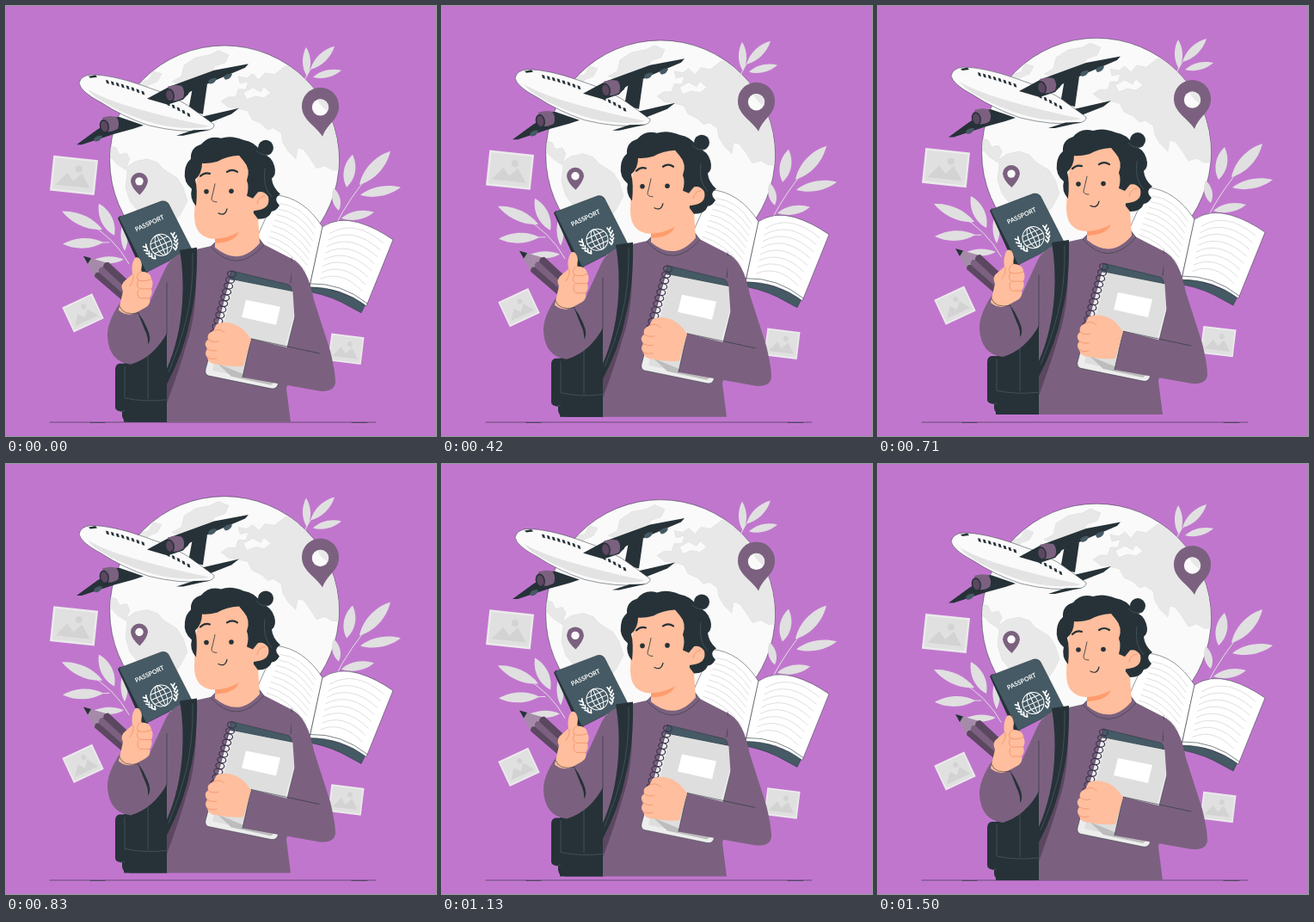
These frames come from a looping animation (500 by 500 pixels, 1.54 s). An HTML page:

```html
<!DOCTYPE html>
<html lang="en">
<head>
<meta charset="utf-8">
<title>Study abroad</title>
<style>
  html, body { margin: 0; width: 100%; height: 100%; overflow: hidden; background: #c176ce; }
  svg { display: block; width: 100vw; height: 100vh; }
  .dark { fill: #263238; }
  .slate { fill: #455a64; }
  .mauve { fill: #7b617f; }
  .deep { fill: #5c4761; }
  .skin { fill: #ffbe9d; }
  .land { fill: #e8e8e8; stroke: #d8d8d8; stroke-width: .5; }
  .white { fill: #fafafa; }
  .ink { fill: none; stroke: #263238; stroke-width: .6; stroke-linecap: round; stroke-linejoin: round; }
  .edge { stroke: #263238; stroke-width: .5; stroke-linejoin: round; }
  .fold { fill: none; stroke: #ee8b63; stroke-width: .7; stroke-linecap: round; }
  .pale { fill: none; stroke: #fff; stroke-width: 1; stroke-linecap: round; }
  .seam { fill: none; stroke: #52636c; stroke-width: .6; }
</style>
</head>
<body>
<svg viewBox="0 0 500 500">
  <defs>
    <clipPath id="disc"><circle cx="254" cy="179.5" r="133"/></clipPath>
    <g id="photo">
      <path d="M-26-20.500H26V20.500H-26z" fill="#ebebeb"/>
      <path d="M-23.500-18H23.500V18H-23.500z" fill="#e0e0e0"/>
      <path d="M-20 13L-8-2L0 7L9-3L20 13z" fill="#d3d3d3"/>
      <circle cx="5" cy="-8" r="4" fill="#d3d3d3"/>
    </g>
    <g id="engine">
      <path class="mauve" d="M-7-8Q5-12 14-7L16 1Q7 10-4 8z"/>
      <path class="dark" d="M9-9L15-7L17 1L11 5Q14-3 9-9z"/>
      <ellipse class="dark" cx="-5" cy="1" rx="5.500" ry="8" transform="rotate(-12)"/>
      <ellipse class="deep" cx="-5" cy="1" rx="4" ry="6.300" transform="rotate(-12)"/>
    </g>
    <path id="pod" class="slate" d="M-5 1Q-2-4 5-3Q4 3-3 4z"/>
  </defs>

  <path class="ink" d="M51 484H430M98 484.500H115M402 484.500H420"/>

  <g id="scene">
    <circle class="white edge" cx="254" cy="179.500" r="133.300"/>
    <g clip-path="url(#disc)" class="land">
      <path d="M151 99L158 88L166 86L171 76L181 79L176 88L166 92L160 101z"/>
      <path d="M193 88L204 82L207 69L221 60L237 57L247 52L259 57L255 66L243 70L238 79L224 84L213 94z"/>
      <path d="M250 111L258 106L267 106L270 97L279 97L282 88L272 90L270 82L280 84L287 79L294 86L301 78L312 80L325 70L345 72L395 115V191L379 191L371 186L361 189L354 178L346 167L339 165L337 178L328 169L322 159L320 148L311 142L304 144L297 137L286 132L281 122L268 119L259 118z"/>
      <path d="M121 163L128 165L132 173L140 171L144 178L140 188L150 181L164 178L176 182L183 190L199 200L206 211L211 227L203 242L193 255L188 280L168 270L156 242L144 227L139 211L141 192L129 184L120 174z"/>
      <path class="white" d="M276 101L287 95L296 100L300 94L308 101L300 107L290 105L280 109z"/>
    </g>

    <g id="leaves" fill="#e0e0e0" stroke="#e0e0e0" stroke-linecap="round"></g>

    <path class="mauve" d="M365.500 95A21.500 21.500 0 0 1 387 117C387 133 374 136 368 152C361 140 344 133 344 117A21.500 21.500 0 0 1 365.500 95z"/>
    <circle class="white" cx="365.500" cy="118" r="9.700"/>
    <path fill="#e8e8e8" d="M362 109A9.700 9.700 0 0 1 374 122Q366 118 362 109z"/>
    <path class="mauve" d="M155 194A10 10 0 0 1 165 204Q164 211 155.500 220Q146 212 145 204A10 10 0 0 1 155 194z"/>
    <circle class="white" cx="155" cy="204" r="4.700"/>

    <use href="#photo" transform="translate(79 197) rotate(6)"/>
    <use href="#photo" transform="translate(89.500 357) rotate(-25) scale(.74 .78)"/>
    <use href="#photo" transform="translate(395.500 399) rotate(7) scale(.74 .78)"/>

    <g id="plane">
      <path class="dark" d="M212 122L217 95L234 91L229 126z"/>
      <path class="dark" d="M219 131L271 119L262 126L234 137z"/>
      <path class="white edge" d="M85 90Q87 81 99 80Q123 80 160 93Q200 106 220 122L242 138Q243 143 233 145Q202 148 166 139Q136 129 110 112Q87 100 85 90z"/>
      <path fill="#e3e3e3" d="M95 97Q113 108 147 118Q188 130 236 140Q228 143 205 142Q180 140 160 133Q128 122 110 110Q100 104 95 97z"/>
      <path class="dark" d="M96 82L104 80.500L106 83L98 84z"/>
      <path class="dark" d="M198 151L218 144.500L237 144L206 151z"/>
      <path class="dark" d="M164 108L190 94L242 75L282 67.500L278 72L245 86L214 100L206 109L188 115z"/>
      <path class="dark" d="M82 161.500L106 144L131 129L160 139L148 143L126 149L88 161.500z"/>
      <use href="#engine" x="119" y="138"/>
      <use href="#engine" x="195" y="102"/>
      <use href="#pod" x="240" y="87"/>
      <use href="#pod" x="258" y="82"/>
      <use href="#pod" x="107" y="154"/>
    </g>

    <g id="book">
      <path class="slate edge" d="M354 320L419 345L413 357L400 350Q380 338 355 333z"/>
      <path fill="#fff" class="edge" d="M368 257Q346 223 314 220L286 282Q328 285 353 326z"/>
      <path fill="#fff" class="edge" d="M368 257Q386 245 410 252Q430 258 450 272L419 349Q390 327 353 327z"/>
      <path class="ink" d="M354 323Q390 322 420 346"/>
      <path id="lines" fill="none" stroke="#d6d6d6" stroke-width=".8"/>
    </g>

    <g id="passport">
      <path class="dark" d="M130 247L133 244L165 311L158 309z"/>
      <path class="slate edge" d="M131 246L181 227Q186 226 189 230L216 283L163 310z"/>
      <text transform="translate(168 255) rotate(-25)" text-anchor="middle" font-family="Lato, sans-serif" font-weight="700" font-size="7.300" fill="#fff">PASSPORT</text>
      <g class="pale" transform="translate(180.500 278) rotate(-24)">
        <circle r="12.500"/><ellipse rx="5.800" ry="12.500"/>
        <path d="M0-12.500V12.500M-12.500 0H12.500M-11-6H11M-11 6H11"/>
        <g id="laurel"></g>
      </g>
    </g>

    <g id="pencil">
      <path fill="#a58ba9" d="M90 291L118 299L103 315z"/>
      <path class="dark" d="M90 291L99 293.500L95 300z"/>
      <path class="deep" d="M103 315Q103 309 108 310Q108 303 113 304Q113 298 119 298L160 336L146 352z"/>
      <path class="mauve" d="M108 310Q108 303 113 304L155 343L151 348z"/>
    </g>

    <g id="backpack">
      <path class="dark" d="M187 376Q170 405 137 416V484H187z"/>
      <path class="dark" d="M138 416H132Q127 417 127 423V467Q127 472 138 472z"/>
      <path class="dark" d="M135 458V477Q136 484 145 484H188V458z"/>
      <path class="seam" d="M165 402V457M138 419V456Q160 461 187 458M135 471H138"/>
    </g>

    <g id="torso">
      <path class="mauve" d="M222 283Q196 286 187 308V484H331L326 445L338 400L358 345Q352 302 330 293L297 276L240 279z"/>
      <path class="mauve" d="M222 283Q194 286 185 306L167 345L132 346Q117 369 118 385Q120 414 145 417Q172 409 188 379L208 310z"/>
      <path class="deep" d="M221 310Q222 358 210 393Q202 422 187 462V430z"/>
      <path class="dark" d="M202 284L222 281Q223 330 214 365Q207 402 187 440V422Q202 388 205 345Q207 312 202 284z"/>
      <path class="seam" d="M217 287Q218 331 209 367Q202 396 189 426"/>
      <path class="ink" d="M187 322V382M332 293Q334 303 331 322"/>
      <path class="dark" d="M153 356Q160 365 164 375Q170 388 165 394Q166 386 161 376Z"/>
    </g>

    <g id="head">
      <path class="mauve edge" d="M238 280Q268 314 300 278L294 270L244 274z"/>
      <path class="skin" d="M243 257L292 232L295 276Q271 304 243 281z"/>
      <path fill="#ff9b6c" d="M243 269Q261 268 272 257Q271 275 243 276z"/>
      <path class="dark" d="M275 158Q290 158 297 171Q309 175 312 186Q315 196 309 201Q310 211 319 219Q310 224 318 232Q314 239 309 239Q306 248 293 248L272 220z"/>
      <circle class="dark" cx="302" cy="165" r="9"/>
      <path class="skin" d="M224 180Q220 210 219 244Q219 269 241 271Q272 270 287 247L292 206L278 171L240 166z"/>
      <path class="skin" d="M284 221Q298 211 305 222Q308 236 291 238L284 239z"/>
      <path class="fold" d="M292 230Q293 222 301 221"/>
      <path class="dark" d="M221 233Q213 224 216 213Q206 205 208 192Q209 183 215 178Q214 165 227 161Q236 150 250 154Q262 150 276 156Q290 158 296 170L300 208L287 224L280 221Q283 210 280 203Q285 190 276 180L271 174Q256 175 246 181Q234 184 228 183Q228 195 220 202Q223 213 221 233z"/>
      <path class="seam" d="M291 168Q298 176 308 172M301 189Q298 211 309 222"/>
      <circle class="dark" cx="233" cy="216" r="2.800"/><circle class="dark" cx="262" cy="215.500" r="2.800"/>
      <path class="ink" style="stroke-width:2.200" d="M226 198Q231 193 237 195M257 193Q263 189 269 193"/>
      <path class="ink" style="stroke-width:.8" d="M243 207Q241 217 239 224Q239 228 245 228"/>
      <path class="ink" style="stroke-width:1.200" d="M247 241Q255 245 257 236"/>
    </g>

    <g id="notebooks">
      <path class="slate edge" d="M262 308L328 324Q333 326 332 334L320 380L250 360z"/>
      <path fill="#ededed" class="edge" d="M260 318L337 333Q342 335 341 341L316 441Q314 446 308 445L235 430Q231 428 232 423z"/>
      <path fill="#dedede" d="M266 319L336 333Q341 335 340 341L314 434Q312 440 308 439L240 424z"/>
      <path fill="#bdbdbd" d="M246 416L275 428L313 437L308 441L262 431z"/>
      <path fill="#fff" d="M279 342L319 350L314 371L274 362z"/>
      <g id="coils" fill="none" stroke="#3f3550" stroke-width="1.200"></g>
    </g>

    <g id="arms">
      <path class="mauve" d="M331 296Q351 308 358 342L377 401Q383 426 383 438Q382 449 365 448L275 432L285 387L338 400z"/>
      <path class="ink" d="M275 432L285 387L364 404"/>
      <path class="skin" d="M285 388L276 419Q259 420 247 417Q235 417 234 409Q230 404 234 399Q229 392 235 388Q233 381 241 378L245 370Q256 366 267 371Q277 375 285 388z"/>
      <path class="fold" d="M234 399Q239 402 245 401M235 388Q240 392 247 390M234 409Q239 412 245 410M241 378Q249 374 254 380"/>
      <path class="skin" d="M131 354L136 332Q132 324 139 319L147 312Q145 301 150 293Q156 290 158 301L157 309Q168 309 169 317Q172 323 169 329Q171 335 167 340Q169 347 162 351L151 357Q141 362 131 354z"/>
      <path class="fold" d="M148 313Q149 320 144 326M157 309Q151 312 153 318Q158 322 169 318M154 319Q150 326 156 329L169 329M154 330Q151 337 156 340L167 340"/>
      <path class="ink" d="M132 349Q136 361 154 357"/>
    </g>
  </g>
</svg>
<script>
const $ = id => document.getElementById(id);
const range = (n, f) => Array.from({ length: n }, (_, i) => f(i)).join('');

// A leaf runs from base (x, y) to tip (u, v) with half width w.
const leaf = ([x, y, u, v, w]) => {
  const len = Math.hypot(u - x, v - y), angle = Math.atan2(v - y, u - x) * 180 / Math.PI;
  return `<path stroke="none" transform="translate(${x} ${y}) rotate(${angle})"
    d="M0 0C${len * .3} ${-w * 1.4} ${len * .7} ${-w * 1.3} ${len} 0C${len * .7} ${w * 1.3} ${len * .3} ${w * 1.4} 0 0z"/>`;
};
$('leaves').innerHTML = [
  [350, 82, 349, 48, 4.5], [354, 74, 382, 47, 5], [357, 83, 390, 75, 4.2],
  [396, 211, 403, 173, 6.5], [411, 208, 447, 169, 7], [412, 220, 459, 211, 5.5],
  [387, 238, 381, 212, 4.5], [390, 247, 428, 240, 5],
  [112, 260, 65, 239, 6.2], [126, 267, 108, 230, 6.5], [113, 275, 66, 277, 5.8],
  [138, 285, 137, 250, 4], [137, 295, 101, 296, 4]
].map(leaf).join('') +
  '<path fill="none" d="M346 89Q353 71 366 62M383 255Q400 222 426 192M143 300Q126 269 94 252M120 275L90 276"/>';

$('lines').setAttribute('d', range(8, i => {
  const k = i / 8;
  return `M${376 - 12 * k} ${265 + 60 * k}Q${405 - 17 * k} ${247 + 68 * k} ${439 - 28 * k} ${276 + 64 * k}` +
    `M${319 - 18 * k} ${230 + 51 * k}Q${343 - 17 * k} ${232 + 57 * k} ${360 - 13 * k} ${259 + 57 * k}`;
}));

$('plane').insertAdjacentHTML('beforeend', range(17, i => {
  const x = 116 + i * 5.9, y = 86 + i * 1.35 + i * i * .065;
  return i > 7 && i < 12 ? '' : `<path class="dark" d="M${x} ${y}l3 .9l1 4l-3-.9z"/>`;
}));

$('laurel').innerHTML = [-1, 1].map(side => range(5, i => {
  const a = .75 - i * .25, x = side * 17.5 * Math.cos(a), y = 17.5 * Math.sin(a);
  return `<path d="M${x} ${y}l${side * 3}-2.500M${x} ${y}l${-side}-3.500" stroke-width="1.700"/>`;
})).join('');

$('coils').innerHTML = range(12, i => {
  const x = 262.5 - i * 1.95, y = 312 + i * 6.8;
  return `<ellipse cx="${x}" cy="${y}" rx="5" ry="3.500" transform="rotate(10 ${x} ${y})"/>`;
});

const PERIOD = 1540, RISE = 8.9, LEAD = 45;
function frame(now) {
  const phase = (now % PERIOD + LEAD) / PERIOD;
  const lift = RISE * Math.abs(Math.sin(Math.PI * phase)) ** 1.7;
  $('scene').setAttribute('transform', `translate(0 ${-lift.toFixed(2)})`);
  requestAnimationFrame(frame);
}
frame(performance.now());
</script>
</body>
</html>
```
